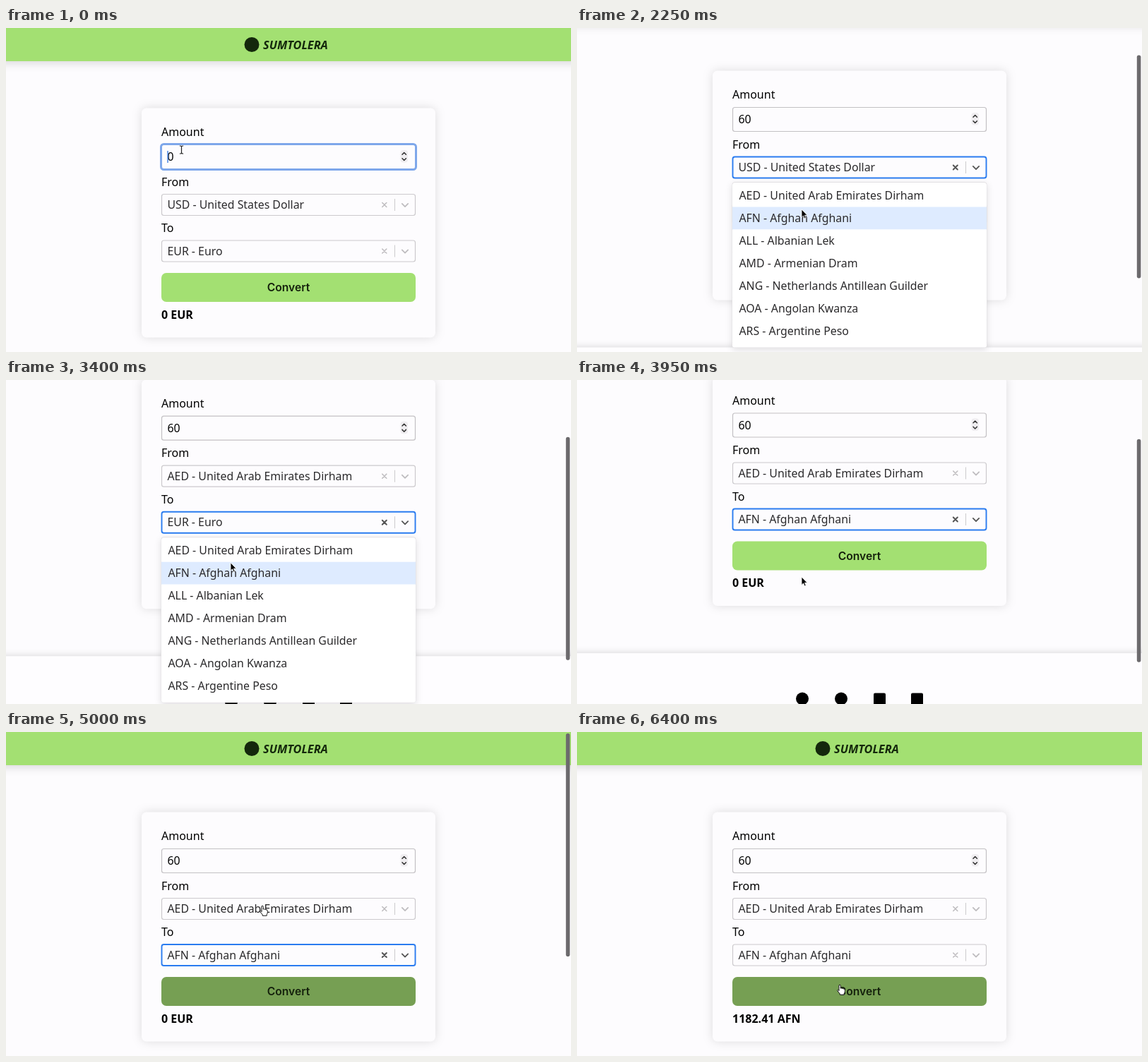
Recreate the animation shown at these times as an HTML page. Size 800 by 459 pixels, loop 6450 ms.

```html
<!DOCTYPE html>
<html lang="en">
<head>
<meta charset="utf-8">
<title>Currency converter</title>
<style>
  html, body { margin: 0; width: 100%; height: 100%; overflow: hidden; background: #fdfcfe; }
  svg { display: block; width: 100vw; height: 100vh; font: 15.85px "Noto Sans", sans-serif; }
  .label { font-weight: 500; font-size: 16px; }
  .value { fill: #2b2a2c; }
  .bold { font-weight: 700; font-size: 16px; }
  .button { font: 600 15.6px Inter, sans-serif; fill: #14200c; text-anchor: middle; }
  .brand { font-weight: 700; font-style: italic; font-size: 16.3px; fill: #14280c; }
  .line { fill: none; stroke-linecap: round; stroke-linejoin: round; }
  .header { filter: drop-shadow(0 2px 7px rgba(0,0,0,.16)); }
  .card { filter: drop-shadow(0 0 7px rgba(0,0,0,.13)); }
  .footer { filter: drop-shadow(0 -1px 5px rgba(0,0,0,.14)); }
  .menu { filter: drop-shadow(0 3px 5px rgba(0,0,0,.12)); }
</style>
</head>
<body>
<svg id="stage" viewBox="0 0 800 459" preserveAspectRatio="none">
  <rect width="800" height="459" fill="#fdfcfe"/>
  <g id="page">
    <rect class="header" x="-20" y="-20" width="840" height="67" fill="#a3e072"/>
    <circle cx="348" cy="23.5" r="10.5" fill="#14280c"/>
    <text class="brand" x="364" y="29.5">SUMTOLERA</text>

    <rect class="footer" x="-20" y="505.5" width="840" height="190" fill="#fefdff"/>
    <circle cx="319" cy="570" r="9"/>
    <circle cx="374" cy="570" r="9"/>
    <rect x="420" y="562" width="17" height="17" rx="2"/>
    <rect x="473" y="562" width="17" height="17" rx="2"/>

    <rect class="card" x="192" y="113.5" width="416" height="325" rx="7" fill="#fdfcfe"/>
    <text class="label" x="220" y="153">Amount</text>
    <rect id="amountBox" fill="#fdfcfe"/>
    <text id="amount" x="228.5" y="188.3"></text>
    <rect id="caret" y="174" width="1.4" height="17" fill="#3f7fe0"/>
    <rect x="558.5" y="173" width="10.5" height="17.5" rx="4" fill="#efedf0"/>
    <path class="line" d="M561 179.3l2.7-2.8 2.7 2.8M561 184.7l2.7 2.8 2.7-2.8" stroke="#333" stroke-width="1.5"/>

    <text class="label" x="220" y="223.5">From</text>
    <g id="from"></g>
    <text class="label" x="220" y="289">To</text>
    <g id="to"></g>

    <rect id="button" x="220" y="347" width="360" height="41" rx="7"/>
    <text class="button" x="400" y="373.4">Convert</text>
    <text id="result" class="bold" x="220" y="411.6"></text>
    <g id="menu"></g>
  </g>
  <rect id="thumb" x="792.8" width="5.6" height="316" rx="2.8" fill="#6c6a6d"/>
  <g id="cursor">
    <path id="ibeam" class="line" d="M-2.2-5.5Q0-5.5 0-4.2Q0-5.5 2.2-5.5M0-4.2V4.2M-2.2 5.5Q0 5.5 0 4.2Q0 5.5 2.2 5.5" stroke="#222" stroke-width="1.2"/>
    <path id="arrow" d="M0 0V11.4L2.6 9 4.3 13 6.2 12.2 4.5 8.3H8Z" stroke="#fff" stroke-width=".8"/>
    <path id="hand" class="line" d="M-1.2 1Q-1.2-.3 0-.3T1.2 1V4.6Q2.4 3.7 3.3 4.9Q4.5 4.2 5.3 5.4Q7.3 4.8 7.3 7V9.4Q7 11 6.2 12V13.7H.2V12.4L-3 8.4Q-3.8 7-2.6 6.6L-1.2 7.8Z" style="fill:#fff" stroke="#111" stroke-width="1"/>
  </g>
</svg>
<script>
const $ = id => document.getElementById(id);
const LOOP = 6450, TICK = 50;
const SELECT_HEIGHT = 30, MENU_HEIGHT = 234, OPTION_HEIGHT = 32;
const OPTIONS = [
  "AED - United Arab Emirates Dirham", "AFN - Afghan Afghani", "ALL - Albanian Lek",
  "AMD - Armenian Dram", "ANG - Netherlands Antillean Guilder", "AOA - Angolan Kwanza",
  "ARS - Argentine Peso", "AUD - Australian Dollar"
];

// Moments of the story, in ms
const TYPED = 850, MOUSE_BACK = 1300, OPEN_FROM = 1950, PICK_FROM = 2600,
  OPEN_TO = 3250, PICK_TO = 3800, SCROLL_UP = 4550, MOVE_DOWN = 5200,
  SUBMIT = 5850, ANSWER = 6050;

const cursorX = [[0, 248.5], [1300, 248.5], [1700, 318], [4000, 318], [4350, 363], [5200, 363], [5600, 372]];
const cursorY = [[0, 172.5], [1300, 172.5], [1700, 264], [1900, 257], [2250, 257], [2450, 239],
  [2650, 239], [3000, 256.5], [3350, 256.5], [3600, 279], [4000, 279], [4350, 246.5], [5200, 246.5], [5600, 358.5]];

const clamp = v => Math.min(1, Math.max(0, v));
const smooth = u => u * u * (3 - 2 * u);
const easeOut = u => 1 - (1 - u) ** 3;
const between = (t, a, b) => t >= a && t < b;

function track(keys, t) {
  const next = keys.findIndex(k => k[0] > t);
  if (next < 0) return keys[keys.length - 1][1];
  const [t0, v0] = keys[next - 1], [t1, v1] = keys[next];
  return v0 + (v1 - v0) * smooth((t - t0) / (t1 - t0));
}

function set(node, attrs) {
  for (const name in attrs) node.setAttribute(name, attrs[name]);
}

function show(node, visible) {
  node.style.display = visible ? "" : "none";
}

function makeSelect(id, top) {
  const group = $(id), mid = top + SELECT_HEIGHT / 2;
  group.innerHTML = `<rect fill="#fdfcfe" x="220.5" y="${top}" width="359" height="${SELECT_HEIGHT}" rx="3"/>
    <text class="value" x="228.5" y="${top + 20.6}"></text>
    <path d="M550.5 ${mid - 8.5}v17" stroke="#cccacd"/>
    <path class="line" d="M532.8 ${mid - 3}l6 6m0-6l-6 6"/>
    <path class="line" d="M560.8 ${mid - 1.6}l4.2 4.2 4.2-4.2" stroke-width="1.8"/>`;
  const [box, text, , cross, chevron] = group.children;
  return (value, focused, hovered) => {
    text.textContent = value;
    set(box, { stroke: focused ? "#2a7cf0" : hovered ? "#aeacaf" : "#cccacd", "stroke-width": focused ? 1.9 : 1.2 });
    set(cross, { stroke: focused ? "#555" : "#bfbdc0", "stroke-width": focused ? 2 : 1.6 });
    set(chevron, { stroke: focused ? "#555" : "#bfbdc0" });
  };
}

const FROM_TOP = 235.5, TO_TOP = 301;
const drawFrom = makeSelect("from", FROM_TOP);
const drawTo = makeSelect("to", TO_TOP);

$("menu").innerHTML = `<clipPath id="menuClip"><rect x="220" width="360" height="${MENU_HEIGHT}" rx="3"/></clipPath>
  <rect class="menu" x="220" width="360" height="${MENU_HEIGHT}" rx="3" fill="#fff" stroke="#e2e0e3"/>
  <g clip-path="url(#menuClip)">${OPTIONS.map((name, i) => {
    const y = 3 + i * OPTION_HEIGHT;
    return `<rect class="option" x="220" y="${y}" width="360" height="${OPTION_HEIGHT}"/>
      <text class="value" x="229.5" y="${y + 21.6}">${name}</text>`;
  }).join("")}</g>`;
const optionRects = [...document.querySelectorAll(".option")];

function scrollAt(t) {
  const down = 53 * easeOut(clamp((t - OPEN_FROM) / 250)) + 65.5 * easeOut(clamp((t - OPEN_TO) / 250));
  return down * (1 - smooth(clamp((t - SCROLL_UP) / 400)));
}

function drawMenu(t, pageY) {
  const fromOpen = between(t, OPEN_FROM, PICK_FROM), open = fromOpen || between(t, OPEN_TO, PICK_TO);
  show($("menu"), open);
  if (!open) return;
  const top = (fromOpen ? FROM_TOP : TO_TOP) + SELECT_HEIGHT + 6;
  set($("menu"), { transform: `translate(0 ${top})` });
  const active = Math.max(0, Math.floor((pageY - top - 3) / OPTION_HEIGHT));
  optionRects.forEach((rect, i) => set(rect, { fill: i === active ? "#deebff" : "#fff" }));
}

function drawCursor(t, x, y, overButton) {
  const ibeam = t < MOUSE_BACK || (t < OPEN_FROM && y < 200);
  set($("cursor"), { transform: `translate(${x} ${y})` });
  show($("cursor"), !between(t, TYPED, MOUSE_BACK));
  show($("ibeam"), ibeam);
  show($("hand"), overButton);
  show($("arrow"), !ibeam && !overButton);
}

function update(t) {
  const scroll = scrollAt(t);
  const x = track(cursorX, t), y = track(cursorY, t), pageY = y + scroll;
  // Hover stays stale while the page scrolls under a resting mouse
  const overButton = between(t, SCROLL_UP, MOVE_DOWN + TICK) || between(pageY, 347, 388) && t > PICK_TO;
  const over = top => !overButton && between(pageY, top, top + SELECT_HEIGHT);

  set($("page"), { transform: `translate(0 ${-scroll})` });
  set($("thumb"), { y: 2 + scroll * .69, opacity: t < OPEN_FROM ? 0 : 1 - clamp((t - SUBMIT) / 250) });

  const typing = t < OPEN_FROM;
  set($("amountBox"), typing
    ? { x: 219.5, y: 164.5, width: 361, height: 36, rx: 4, stroke: "#7ea7ea", "stroke-width": 3 }
    : { x: 220.5, y: 165.5, width: 359, height: 34, rx: 3, stroke: "#c3c1c4", "stroke-width": 1.2 });
  $("amount").textContent = t < TYPED ? "0" : "60";
  set($("caret"), { x: t < TYPED ? 228.3 : 237.2 });
  show($("caret"), typing && !between(t, 450, TYPED));

  drawFrom(t < PICK_FROM ? "USD - United States Dollar" : OPTIONS[0], between(t, OPEN_FROM, OPEN_TO), over(FROM_TOP));
  drawTo(t < PICK_TO ? "EUR - Euro" : OPTIONS[1], between(t, OPEN_TO, SUBMIT), over(TO_TOP));
  set($("button"), { fill: overButton ? "#769f53" : "#a3e072" });
  $("result").textContent = t < ANSWER ? "0 EUR" : "1182.41 AFN";

  drawMenu(t, pageY);
  drawCursor(t, x, y, overButton);
}

const start = performance.now();
function frame() {
  const t = (performance.now() - start) % LOOP;
  update(Math.floor(t / TICK) * TICK);
  requestAnimationFrame(frame);
}
frame();
</script>
</body>
</html>
```
